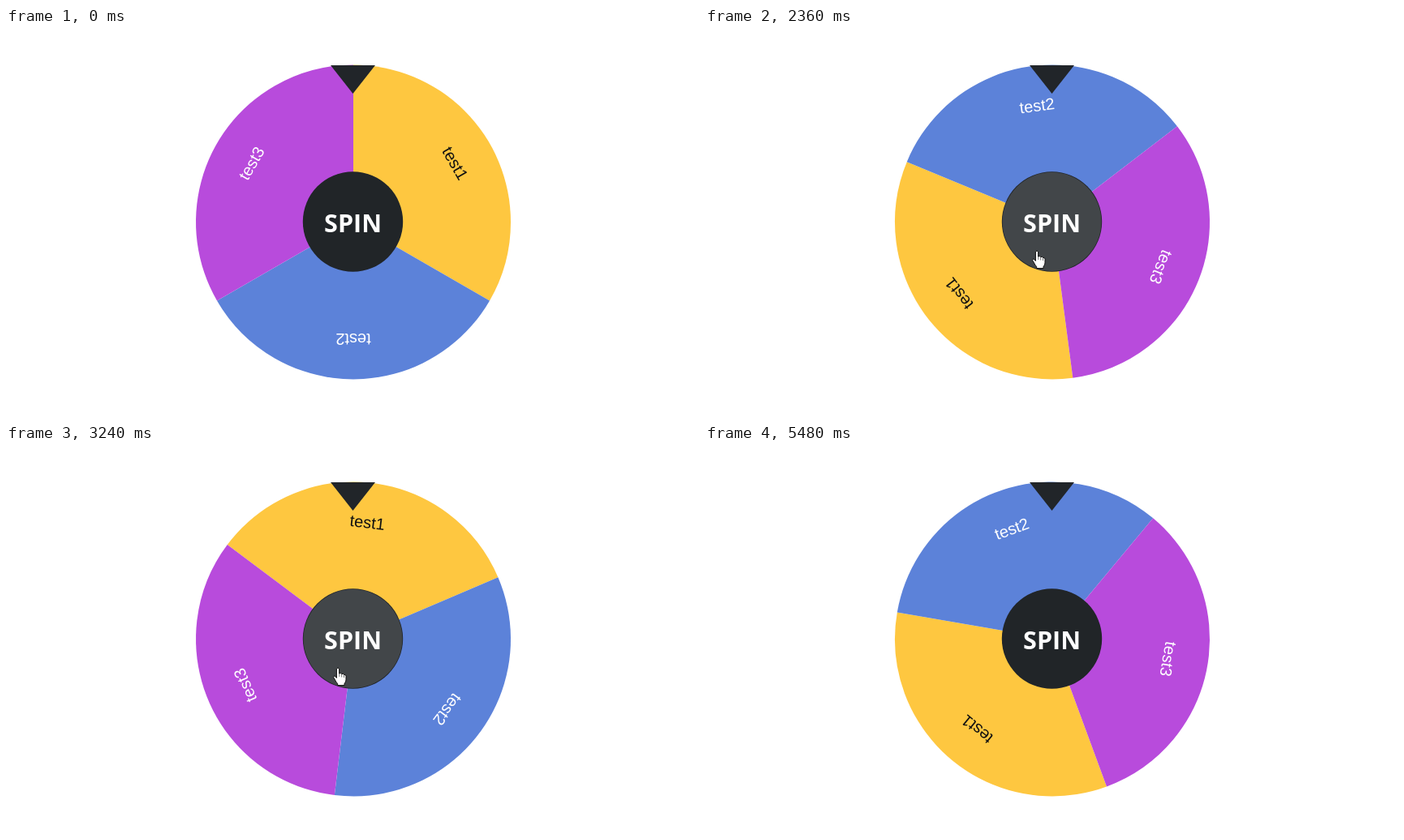
Recreate the animation shown at these times as an HTML page with a canvas. Size 854 px wide and 480 px high, loop 5520 ms.

```html
<!DOCTYPE html>
<html lang="en">
<head>
<meta charset="utf-8">
<title>Spin wheel</title>
<style>
html, body { margin: 0; width: 100%; height: 100%; overflow: hidden; background: #fff; }
canvas { display: block; }
</style>
</head>
<body>
<canvas id="stage" width="854" height="480"></canvas>
<script>
const ctx = document.getElementById('stage').getContext('2d');
const LOOP = 5520, STEP = 40, RAD = Math.PI / 180;
const CX = 428, CY = 239.4, RADIUS = 194;
const HUB = { x: 427.5, y: 239, r: 61.7 };

const sectors = [
  { label: 'test1', fill: '#fec740', ink: '#111' },
  { label: 'test2', fill: '#5c82d9', ink: '#fff' },
  { label: 'test3', fill: '#b84bdc', ink: '#fff' }
];

// Spin: fast start, long ease-out
const SPIN = { from: 2017, to: 4031, turn: 3039.8, power: 2.8446 };

// Pointer path: time, x, y
const path = [
  [560, 842, 446], [760, 700, 385], [960, 520, 310], [1160, 409, 275],
  [4200, 409, 275], [4320, 547, 293], [4520, 841, 322], [4600, 960, 335]
];

const arrow = new Path2D('M0 0V16L3.8 12.5L6.3 18.6L9 17.4L6.5 11.6H11.3Z');
const hand = new Path2D(
  'M-1.6 1Q0-1 1.6 1V7Q3.6 5.8 4.6 7.6Q6.6 6.6 7.4 8.4Q9.8 7.8 10 10.4' +
  'V15Q9.8 17.5 8 19.5V21.5H-.3V19.6Q-2.4 17.5-3.4 15L-5.4 11.6' +
  'Q-5.6 9.6-3.6 10.2L-1.6 12.4Z');
const fingers = new Path2D('M1.8 7V11M4.7 8V11.5M7.5 9V12');

const clamp = v => Math.min(1, Math.max(0, v));
const smooth = v => { v = clamp(v); return v * v * (3 - 2 * v); };

function wheelAngle(t) {
  const left = 1 - clamp((t - SPIN.from) / (SPIN.to - SPIN.from));
  return SPIN.turn * (1 - left ** SPIN.power) * RAD;
}

function pointerAt(t) {
  const i = path.findIndex(p => p[0] > t);
  if (i < 1) return null;
  const a = path[i - 1], b = path[i], k = (t - a[0]) / (b[0] - a[0]);
  return { x: a[1] + (b[1] - a[1]) * k, y: a[2] + (b[2] - a[2]) * k };
}

function drawWheel(angle) {
  ctx.save();
  ctx.translate(CX, CY);
  ctx.rotate(angle);
  ctx.font = '20px "Liberation Sans", Arial, sans-serif';
  ctx.textAlign = 'center';
  for (const s of sectors) {
    ctx.fillStyle = s.fill;
    ctx.beginPath();
    ctx.moveTo(0, 0);
    ctx.arc(0, 0, RADIUS, -90 * RAD, 30 * RAD);
    ctx.fill();
    ctx.rotate(60 * RAD);
    ctx.fillStyle = s.ink;
    ctx.fillText(s.label, 0, -138);
    ctx.rotate(60 * RAD);
  }
  ctx.restore();
}

function drawHub(hover) {
  const shade = c => Math.round(c + 33 * hover);
  ctx.fillStyle = '#212529';
  ctx.beginPath();
  ctx.moveTo(400, 46);
  ctx.lineTo(455, 46);
  ctx.lineTo(427.5, 81);
  ctx.fill();
  ctx.beginPath();
  ctx.arc(HUB.x, HUB.y, HUB.r, 0, 2 * Math.PI);
  ctx.fill();
  ctx.fillStyle = `rgb(${shade(33)},${shade(37)},${shade(40)})`;
  ctx.beginPath();
  ctx.arc(HUB.x, HUB.y, HUB.r - 0.8, 0, 2 * Math.PI);
  ctx.fill();
  ctx.fillStyle = '#fff';
  ctx.font = 'bold 30.5px "Open Sans", "Noto Sans", sans-serif';
  ctx.textAlign = 'center';
  ctx.fillText('SPIN', 427.5, 252);
}

function drawPointer(p) {
  const over = Math.hypot(p.x - HUB.x, p.y - HUB.y) < HUB.r;
  const shape = over ? hand : arrow;
  ctx.save();
  ctx.translate(p.x, p.y);
  ctx.fillStyle = '#fff';
  ctx.strokeStyle = '#111';
  ctx.lineJoin = 'round';
  ctx.lineWidth = 1;
  ctx.fill(shape);
  ctx.stroke(shape);
  if (over) {
    ctx.lineWidth = 0.6;
    ctx.stroke(fingers);
  }
  ctx.restore();
}

function draw(t) {
  ctx.fillStyle = '#fff';
  ctx.fillRect(0, 0, 854, 480);
  drawWheel(wheelAngle(t));
  drawHub(smooth((t - 1080) / 150) - smooth((t - 4300) / 150));
  const p = pointerAt(t);
  if (p) drawPointer(p);
}

const start = performance.now();
function tick() {
  const t = (performance.now() - start) % LOOP;
  draw(Math.floor(t / STEP) * STEP);
  requestAnimationFrame(tick);
}
tick();
</script>
</body>
</html>
```
